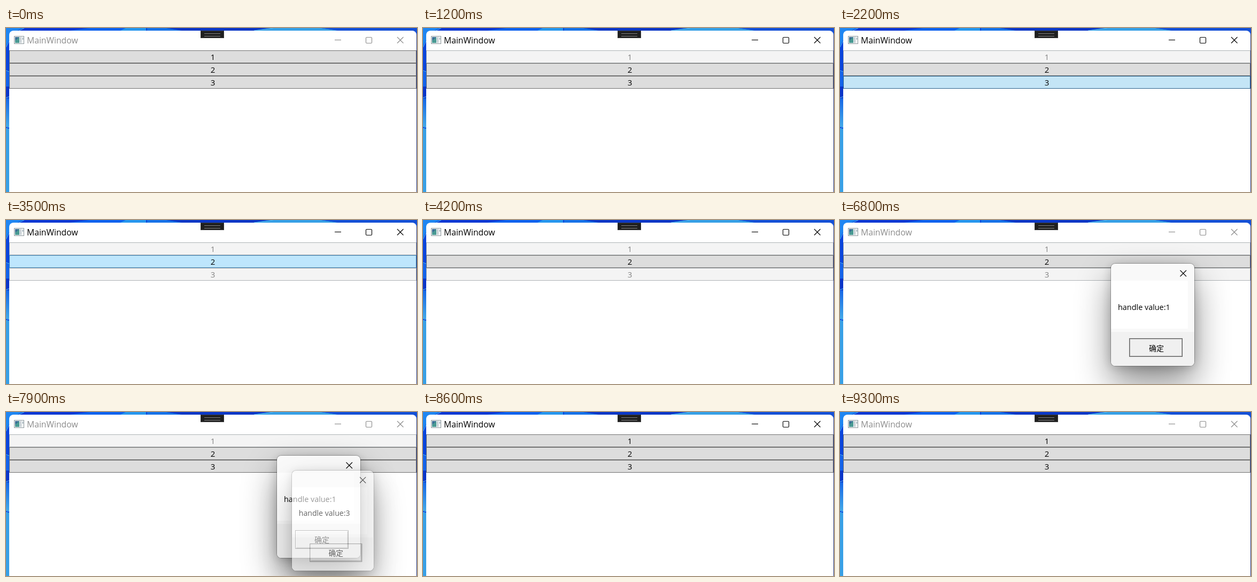
Recreate the animation shown at these times as an HTML page. Size 769 by 308 pixels, loop 9400 ms.

```html
<!DOCTYPE html>
<html lang="en">
<head>
<meta charset="utf-8">
<title>Window with three buttons</title>
<style>
  html, body { margin: 0; width: 100%; height: 100%; overflow: hidden; }
  body { position: relative; font-family: "Open Sans", "Noto Sans", sans-serif; }
  body *, body { box-sizing: border-box; }
  div, svg { position: absolute; }

  #stage { left: 0; top: 0; width: 769px; height: 308px; overflow: hidden; background: #0a45dc; }
  #wallpaper { left: 0; top: 0; }
  #window { left: 6px; top: 5px; width: 762px; height: 320px; border-radius: 8px 8px 0 0; background: #fff; }

  #chrome { left: 0; top: 0; width: 769px; height: 42px; }
  #chrome svg { left: 0; top: 0; }
  #title { left: 39px; top: 13px; font-size: 15.7px; line-height: 20px; }
  .stroke { fill: none; stroke: currentColor; stroke-width: 1.15; }

  #grip { left: 364px; top: 5px; width: 44px; height: 14px; background: #1f1f1f; border: 1px solid #3a3a3a; }
  #grip::before { content: ""; position: absolute; left: 6px; top: 4px; width: 30px; height: 4px;
    border: solid #858585; border-width: 1px 0; }

  .row { left: 6px; width: 762px; height: 24px; border: 1px solid #707070; background: #ddd;
    font-size: 15px; line-height: 22px; text-align: center; }
  #row1 { top: 42px; }
  #row2 { top: 66px; }
  #row3 { top: 90px; }

  .dialog { width: 156px; height: 192px; border-radius: 8px; background: #f9f9f9; transform-origin: 0 25%;
    box-shadow: 0 0 0 1px rgba(0,0,0,.26), 0 2px 20px rgba(0,0,0,.2), 0 32px 64px rgba(0,0,0,.46); }
  #first { left: 507px; top: 82px; }
  #second { left: 535px; top: 109px; }
  .panel { left: 0; top: 32px; width: 144px; height: 90px; background: #fff; }
  .footer { left: 0; top: 128px; width: 156px; height: 64px; border-radius: 0 0 8px 8px; background: #f1f1f1; }
  .message { left: 13px; top: 72px; font-size: 14.4px; line-height: 20px; white-space: nowrap; color: #000; }
  .cross { left: 129px; top: 12px; }
  .ok { left: 34px; top: 140px; width: 100px; height: 35px; border: 1px solid #646464; background: #f0f0f0;
    font: 14px/33px "Noto Sans CJK SC", "Noto Sans CJK", sans-serif; text-align: center; }
</style>
</head>
<body>
<div id="stage">
  <svg id="wallpaper" width="769" height="308">
    <defs>
      <linearGradient id="petal" x2="0" y2="1">
        <stop offset="0" stop-color="#1767e6"/><stop offset="1" stop-color="#43a9e8"/>
      </linearGradient>
    </defs>
    <path fill="#1f86f2" d="M0 0H32Q12 6 0 34Z"/>
    <path fill="#0b38d4" d="M36 0H156L120 5H26Z"/>
    <path fill="#0d62ee" d="M156 0H226V5H120Z"/>
    <path fill="#2696ee" d="M224 0H262V5H214Z"/>
    <path fill="#1672e8" d="M264 0H300L330 5H264Z"/>
    <path fill="#0a37c6" d="M300 0H500L464 5H330Z"/>
    <path fill="#369fe6" d="M500 0H590L622 5H464Z"/>
    <path fill="#1450d6" d="M590 0H769V14H760V5H622Z"/>
    <path fill="#1463ea" d="M0 82H6V110H0Z"/>
    <path fill="#0a35c8" d="M0 110H6V132H0Z"/>
    <path fill="url(#petal)" d="M0 132H6V186H0Z"/>
    <path fill="#38a0e6" d="M0 189H6V308H0Z"/>
    <path fill="none" stroke="#55bdf4" d="M0 36Q12 8 34 0M0 80L6 82M0 131L6 129M0 189L6 186M500 0L464 5"/>
    <path fill="#24377f" d="M768 12H769V308H768Z"/>
  </svg>

  <div id="window"></div>

  <svg width="40" height="42">
    <rect x="15.5" y="15.5" width="18" height="14" fill="#f4f6f7" stroke="#8d979c"/>
    <rect x="17" y="17" width="8" height="11" fill="#4a9a93"/>
    <path fill="#3c6f96" d="M17 17H25L17 24Z"/>
    <path fill="#c5cfd4" d="M26 17H29V28H26Z"/>
    <path stroke="#6d8796" d="M31.5 18V22"/>
  </svg>
  <div id="chrome">
    <div id="title">MainWindow</div>
    <svg class="stroke" width="769" height="42">
      <path d="M615 22.5H627"/>
      <rect x="673.5" y="17.5" width="11" height="11" rx="1.5"/>
      <path d="M732 17L743.5 28.5M743.5 17L732 28.5"/>
    </svg>
  </div>

  <div class="row" id="row1">1</div>
  <div class="row" id="row2">2</div>
  <div class="row" id="row3">3</div>
  <div id="grip"></div>

  <div class="dialog" id="first">
    <div class="panel"></div><div class="footer"></div>
    <svg class="cross stroke" width="13" height="13"><path d="M.5 .5L12 12M12 .5L.5 12"/></svg>
    <div class="message">handle value:1</div>
    <div class="ok">确定</div>
  </div>
  <div class="dialog" id="second">
    <div class="panel"></div><div class="footer"></div>
    <svg class="cross stroke" width="13" height="13"><path d="M.5 .5L12 12M12 .5L.5 12"/></svg>
    <div class="message">handle value:3</div>
    <div class="ok">确定</div>
  </div>
</div>

<script>
  const LOOP = 9400;
  const sheet = document.head.appendChild(document.createElement('style'));
  let count = 0;

  // Builds a stepped CSS animation from [time, declarations] pairs.
  // Steps fall just before their time so that the new state is in place on it.
  function track(selector, steps) {
    const name = 'track' + count++;
    const frames = steps.map(([time, css]) =>
      `${(Math.max(0, time - 4) / LOOP * 100).toFixed(4)}% { ${css} }`);
    const last = steps[steps.length - 1][1];
    sheet.append(`@keyframes ${name} { ${frames.join(' ')} 100% { ${last} } }
      ${selector} { animation: ${name} ${LOOP}ms step-end infinite; }\n`);
  }

  const face = (fill, edge, ink) => `background: ${fill}; border-color: ${edge}; color: ${ink};`;
  const idle = face('#ddd', '#707070', '#000');
  const hover = face('#bee6fd', '#3c7fb1', '#000');
  const press = face('#c4e5f6', '#2c628b', '#000');
  const off = face('#f4f4f4', '#adb2b5', '#838383');

  track('#row1', [[0, idle], [600, hover], [1000, press], [1200, off], [8500, idle], [8900, hover], [9000, idle]]);
  track('#row2', [[0, idle], [200, hover], [600, idle], [1500, hover], [1900, idle], [3500, hover],
    [3800, press], [4000, hover], [4200, idle], [8800, hover], [8900, idle]]);
  track('#row3', [[0, idle], [1900, hover], [2200, press], [2400, off], [7900, idle]]);

  const dim = 'color: #8c8c8c;';
  const lit = 'color: #000;';
  track('#chrome', [[0, dim], [1000, lit], [5800, dim], [8500, lit], [9300, dim]]);
  track('#first .cross', [[0, lit], [7000, dim], [7900, lit]]);

  const pose = (opacity, scale) => `opacity: ${opacity}; transform: scale(${scale});`;
  const hidden = pose(0, 1), shown = pose(1, 1), leaving = pose(.6, .98);
  const dialog = (id, open, close) => track(id, [[0, hidden], [open, pose(.4, .94)],
    [open + 100, pose(.85, .985)], [open + 200, shown], [close, leaving], [close + 100, hidden]]);
  dialog('#first', 5800, 8500);
  dialog('#second', 7000, 7900);

  const raised = 'padding: 0; box-shadow: inset 1px 1px #fff, inset -1px -1px #8c8c8c, inset -2px -2px #d0d0d0;';
  const sunken = 'padding: 1px 0 0 2px; box-shadow: inset 0 0 0 1px #a0a0a0;';
  track('#first .ok', [[0, raised], [6800, sunken], [7000, raised], [8400, sunken], [8500, raised]]);
  track('#second .ok', [[0, raised], [7700, sunken], [7900, raised]]);
</script>
</body>
</html>
```
